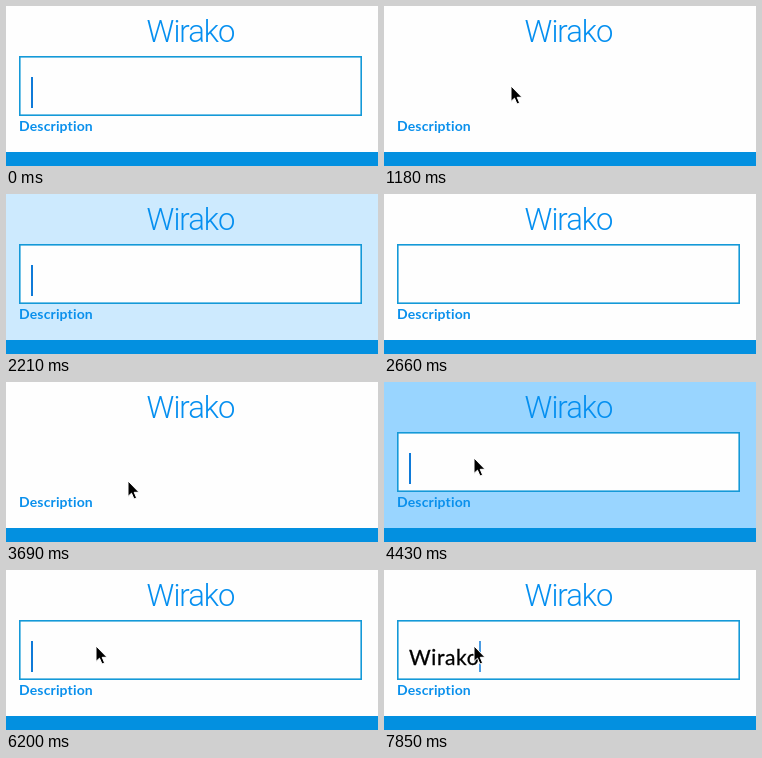
Recreate the animation shown at these times as an HTML page. Size 372x160 px, loop 8 s.

```html
<!DOCTYPE html>
<html lang="en">
<head>
<meta charset="utf-8">
<title>Input focus effect</title>
<style>
  html, body { margin: 0; width: 100%; height: 100%; overflow: hidden; background: #fefefe; }
  svg { display: block; }
  .title { font: 300 31px Roboto, "Open Sans", sans-serif; letter-spacing: -1px; fill: #058ff0; }
  .label { font: 700 14px Lato, "Open Sans", sans-serif; letter-spacing: .15px; fill: #0a90ec; }
  .typed { font: 400 21px Lato, "Open Sans", sans-serif; letter-spacing: .6px; fill: #000; stroke: #000; stroke-width: .3px; }
</style>
</head>
<body>
<svg width="372" height="160" viewBox="0 0 372 160">
  <rect width="372" height="160" fill="#fefefe"/>
  <rect id="glow" fill="#0096ff"/>
  <rect y="146" width="372" height="14" fill="#0390e0"/>
  <rect x="13" y="50" width="343" height="60" fill="#fefefe"/>
  <rect id="border" x="13.8" y="50.8" width="341.4" height="58.4" fill="none" stroke="#1499d8" stroke-width="1.6"/>
  <text class="title" x="184.5" y="35.5" text-anchor="middle">Wirako</text>
  <text class="label" x="13" y="125">Description</text>
  <text class="typed" id="typed" x="25" y="94.5"></text>
  <rect id="caret" y="71" width="2" height="31" fill="#0f7ad8"/>
  <path id="pointer" d="M0 0V15.4L3.5 12.2L6 18L8.6 16.9L6.2 11.3H11Z" fill="#000" stroke="#fff" stroke-width="1" stroke-linejoin="round"/>
</svg>
<script>
const LOOP = 8000;
const TICK = 147.7;
const $ = id => document.getElementById(id);
const glow = $('glow'), border = $('border'), typed = $('typed');
const caret = $('caret'), pointer = $('pointer');

// [tick, caret opacity, typed text]
const inputStates = [
  [0, 1, ''], [2, 0, ''], [12, 1, ''], [16, .2, ''], [17, 0, ''], [19, .4, ''],
  [20, 1, ''], [22, 0, ''], [28, 1, ''], [32, .15, ''], [33, 0, ''],
  [35, 1, 'W'], [37, 1, 'Wo'], [40, 1, 'W'], [42, 1, ''], [45, .2, ''], [46, 0, ''],
  [47, 1, 'W'], [48, 1, 'Wi'], [50, 1, 'Wira'], [53, .75, 'Wirako']
];

// [tick, x, y]; no position hides the pointer
const pointerStates = [
  [0], [5, 203, 98], [6, 176, 92], [7, 148, 85], [8, 127, 80], [9, 118, 78],
  [13, 145, 113], [14], [24, 148, 126], [25, 122, 99], [26, 100, 82], [27, 90, 76]
];

const stateAt = (states, tick) => states.findLast(s => s[0] <= tick);

function set(el, attrs) {
  for (const name in attrs) el.setAttribute(name, attrs[name]);
}

function drawGlow(tick) {
  const age = tick >= 28 ? tick - 28 : tick - 12;
  if (age < 0 || age >= 5) return set(glow, { opacity: 0 });
  const top = 30 * age, bottom = 19.5 * age;
  set(glow, {
    x: 13 - top, y: 50 - top,
    width: 343 + 2 * top, height: 60 + top + bottom,
    opacity: (1 - age / 5) ** 1.8
  });
}

function draw(time) {
  const tick = Math.floor((time % LOOP + 10) / TICK);
  drawGlow(tick);

  const focused = tick < 2 || (tick >= 12 && tick < 22) || tick >= 28;
  set(border, { opacity: focused ? 1 : 0 });

  const [, opacity, text] = stateAt(inputStates, tick);
  if (typed.textContent !== text) typed.textContent = text;
  const width = text ? typed.getComputedTextLength() : 0;
  set(caret, { x: 25 + Math.round(width), opacity });

  const [, x, y] = stateAt(pointerStates, tick);
  set(pointer, { opacity: x ? 1 : 0, transform: `translate(${x || 0} ${y || 0})` });
}

let start;
function frame(now) {
  start ??= now;
  draw(now - start);
  requestAnimationFrame(frame);
}
draw(0);
requestAnimationFrame(frame);
</script>
</body>
</html>
```
